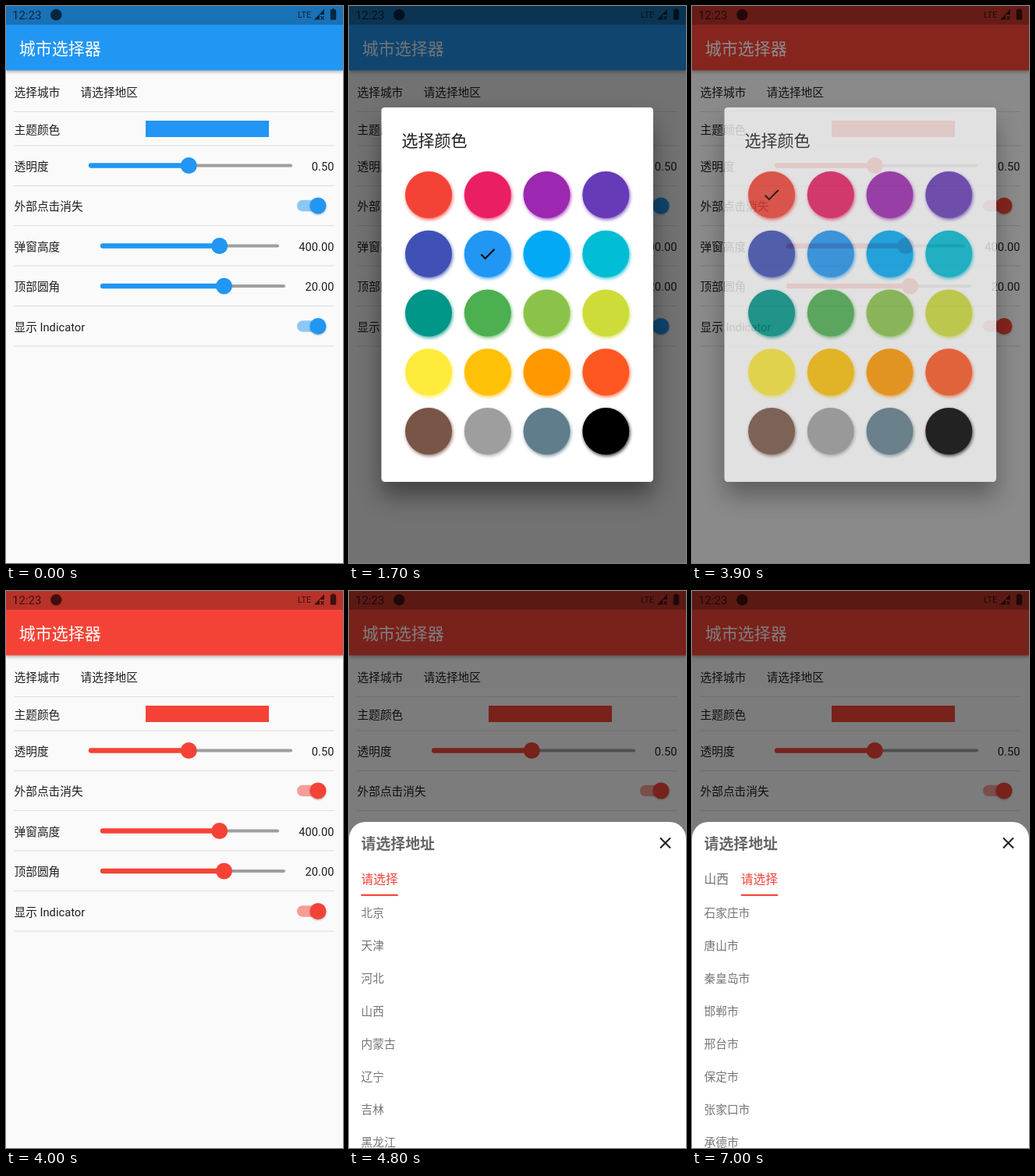
These frames come from a looping animation (432 by 714 pixels, 8000 ms). An HTML page:

```html
<!DOCTYPE html>
<html lang="zh-CN">
<head>
<meta charset="utf-8">
<title>城市选择器</title>
<style>
html, body { margin: 0; width: 100%; height: 100%; overflow: hidden; background: #fafafa; }
svg { display: block; width: 432px; height: 714px; font: 14.7px Roboto, "Noto Sans CJK SC", "Noto Sans CJK", sans-serif; }
.theme { fill: currentColor; }
.line { stroke: #dedede; stroke-width: 1.05; }
.inactive, .active { stroke: #9e9e9e; stroke-width: 4.2; stroke-linecap: round; }
.active { stroke: currentColor; stroke-width: 6.3; }
.label { fill: #1f1f1f; }
.item { fill: #757575; }
.status { fill: #000; opacity: .66; }
.bar { filter: drop-shadow(0 2px 2px rgba(0,0,0,.3)); }
.knob { filter: drop-shadow(0 1px 1px rgba(0,0,0,.3)); }
.card { filter: drop-shadow(0 18px 15px rgba(0,0,0,.42)); }
</style>
</head>
<body>
<svg id="stage" viewBox="0 0 432 714"></svg>
<script>
const LOOP = 8000, STEP = 100;
const BLUE = [33, 150, 243], RED = [244, 67, 54];
const COLORS = ('f44336 e91e63 9c27b0 673ab7 3f51b5 2196f3 03a9f4 00bcd4 009688 4caf50 ' +
  '8bc34a cddc39 ffeb3b ffc107 ff9800 ff5722 795548 9e9e9e 607d8b 000000').split(' ');
const PROVINCES = '北京 天津 河北 山西 内蒙古 辽宁 吉林 黑龙江'.split(' ');
const CITIES = '石家庄市 唐山市 秦皇岛市 邯郸市 邢台市 保定市 张家口市 承德市'.split(' ');

// Text is placed by the vertical centre of its glyphs.
const text = (x, mid, str, size = 14.7, attrs = 'class="label"') =>
  `<text x="${x}" y="${mid + size * .375}" font-size="${size}" ${attrs}>${str}</text>`;

const line = (x1, x2, y, cls) => `<path class="${cls}" d="M${x1} ${y}H${x2}"/>`;

const slider = (x1, x2, y, at, value) =>
  line(x1 + 2, x2 - 2, y, 'inactive') + line(x1 + 3, at, y, 'active') +
  `<circle class="theme" cx="${at}" cy="${y}" r="10.5"/>` +
  text(420.5, y + .5, value, 14.7, 'class="label" text-anchor="end"');

const toggle = y =>
  `<rect class="theme" opacity=".5" x="373" y="${y - 7.3}" width="35" height="14.6" rx="7.3"/>
   <circle class="theme knob" cx="400" cy="${y}" r="10.5"/>`;

const cell = i => [102 + i % 4 * 75.75, 242 + Math.floor(i / 4) * 75.75];

const swatch = (color, i) => {
  const [x, y] = cell(i);
  return `<circle cx="${x}" cy="${y}" r="30" fill="#${color}"
    style="filter:drop-shadow(1px 2px 2px #${color}cc)"/>`;
};

const check = (id, i) => {
  const [x, y] = cell(i);
  return `<path id="${id}" transform="translate(${x} ${y}) scale(1.05) translate(-12 -12)"
    d="M9 16.2 4.8 12l-1.4 1.4L9 19 21 7l-1.4-1.4z"/>`;
};

const list = (id, names) =>
  `<g id="${id}">${names.map((n, i) => text(15.5, 412.5 + 42 * i, n, 14.7, 'class="item"')).join('')}</g>`;

const labels = [['选择城市', 110], ['主题颜色', 158], ['透明度', 205], ['外部点击消失', 256.5],
  ['弹窗高度', 308], ['顶部圆角', 359.5], ['显示 Indicator', 411]];

stage.innerHTML = `
<clipPath id="cityRow"><rect x="95" y="83" width="326" height="52"/></clipPath>
<clipPath id="colorRow"><rect x="95" y="136" width="326" height="42"/></clipPath>
<rect width="432" height="714" fill="#fafafa"/>
<g id="cityPress" clip-path="url(#cityRow)">
  <rect id="highlight" x="95" y="83" width="326" height="52"/>
  <circle id="splash" cx="150" cy="108.5" opacity=".1"/>
</g>
<g id="colorPress" clip-path="url(#colorRow)"><circle cx="211" cy="157" r="47" opacity=".1"/></g>
<rect class="theme bar" width="432" height="82.5"/>
<rect width="432" height="24" opacity=".25"/>
<g class="status">
  <text x="8" y="17" font-size="15">12:23</text>
  <circle cx="64.3" cy="11.3" r="7.2"/>
  <text x="374" y="15" font-size="11">LTE</text>
  <path d="M408 4V11H402V17.5H395z"/>
  <path d="M403.5 13l4 4.5m0-4.500l-4 4.500" stroke="#000" stroke-width="1.3"/>
  <path d="M417 4.500h1V3.500h3v1h1q1.200 0 1.200 1.200V16.500q0 1.200-1.200 1.200h-5q-1.200 0-1.200-1.200V5.700q0-1.200 1.200-1.200z"/>
</g>
${text(16.8, 54.5, '城市选择器', 21, 'fill="#fff" font-weight="500"')}
${labels.map(([str, y]) => text(10.5, y, str)).join('')}
${text(95.5, 110, '请选择地区')}
${[135.5, 179, 230.5, 281.5, 333, 384.5, 436].map(y => line(10.5, 421, y, 'line')).join('')}
<rect class="theme" x="179" y="147" width="158" height="21"/>
${slider(106, 367, 204.5, 234.3, '0.50')}
${slider(121, 350, 307.5, 273.7, '400.00')}
${slider(121, 358, 359, 279.5, '20.00')}
${toggle(256)}${toggle(410.5)}
<rect id="barrier" width="432" height="714"/>
<g id="dialog">
  <rect class="card" x="41.500" y="130" width="348.500" height="480" rx="4.200" fill="#fff"/>
  ${text(67.500, 172, '选择颜色', 21)}
  ${COLORS.map(swatch).join('')}
  ${check('checkBlue', 5)}${check('checkRed', 0)}
</g>
<g id="sheet">
  <rect y="296" width="432" height="460" rx="21" fill="#fff"/>
  ${text(15.500, 324, '请选择地址', 18.9, 'fill="#666" font-weight="700"')}
  <path d="M399 316.500l13 13m0-13l-13 13" stroke="#1f1f1f" stroke-width="2.100"/>
  ${text(15.500, 369, '', 15.75, 'id="tab1"')}
  ${text(62.800, 369, '请选择', 15.75, 'id="tab2"')}
  <rect id="indicator" class="theme" y="388.700" width="47.250" height="2.200"/>
  ${list('provinces', PROVINCES)}${list('cities', CITIES)}
</g>`;

const $ = id => document.getElementById(id);
const set = (id, attrs) => { for (const k in attrs) $(id).setAttribute(k, attrs[k]); };
const show = (id, on) => set(id, { visibility: on ? 'visible' : 'hidden' });
const ramp = (t, from, to) => Math.min(1, Math.max(0, (t - from) / (to - from)));
const mix = (a, b, p) => `rgb(${a.map((v, i) => Math.round(v + (b[i] - v) * p))})`;
const easeOut = p => 1 - (1 - p) ** 3;

function render(now) {
  const t = Math.floor(now % LOOP / STEP) * STEP;

  const recolor = ramp(t, 2900, 3200);
  stage.style.color = mix(BLUE, RED, recolor);
  set('checkBlue', { opacity: 1 - recolor });
  set('checkRed', { opacity: recolor });

  const dialogAlpha = t < 1700 || t >= 4000 ? 0 : t < 3900 ? 1 : .75;
  const open = t < 4700 ? 0 : t < 4800 ? .7 : 1;
  set('dialog', { opacity: dialogAlpha });
  set('sheet', { transform: `translate(0 ${(1 - open) * 418})` });
  show('sheet', open > 0);
  set('barrier', { opacity: open ? .5 * open : dialogAlpha === .75 ? .45 : .54 * dialogAlpha });

  const press = ramp(t, 4400, 4600);
  show('colorPress', t >= 1500 && t < 1700);
  show('cityPress', t >= 4500 && t < 4800);
  set('highlight', { opacity: .045 * press });
  set('splash', { r: t < 4700 ? 23 * press : 42 });

  const picked = t >= 6700, slide = easeOut(ramp(t, 6600, 7000));
  const gray = [112, 112, 112];
  $('tab1').textContent = picked ? '山西' : '请选择';
  set('tab1', { fill: mix(RED, gray, slide) });
  set('tab2', { fill: mix(gray, RED, slide) });
  set('indicator', { x: 15.5 + 47.25 * slide });
  show('tab2', picked);
  show('provinces', open && !picked);
  show('cities', picked);

  requestAnimationFrame(render);
}
render(0);
</script>
</body>
</html>
```
